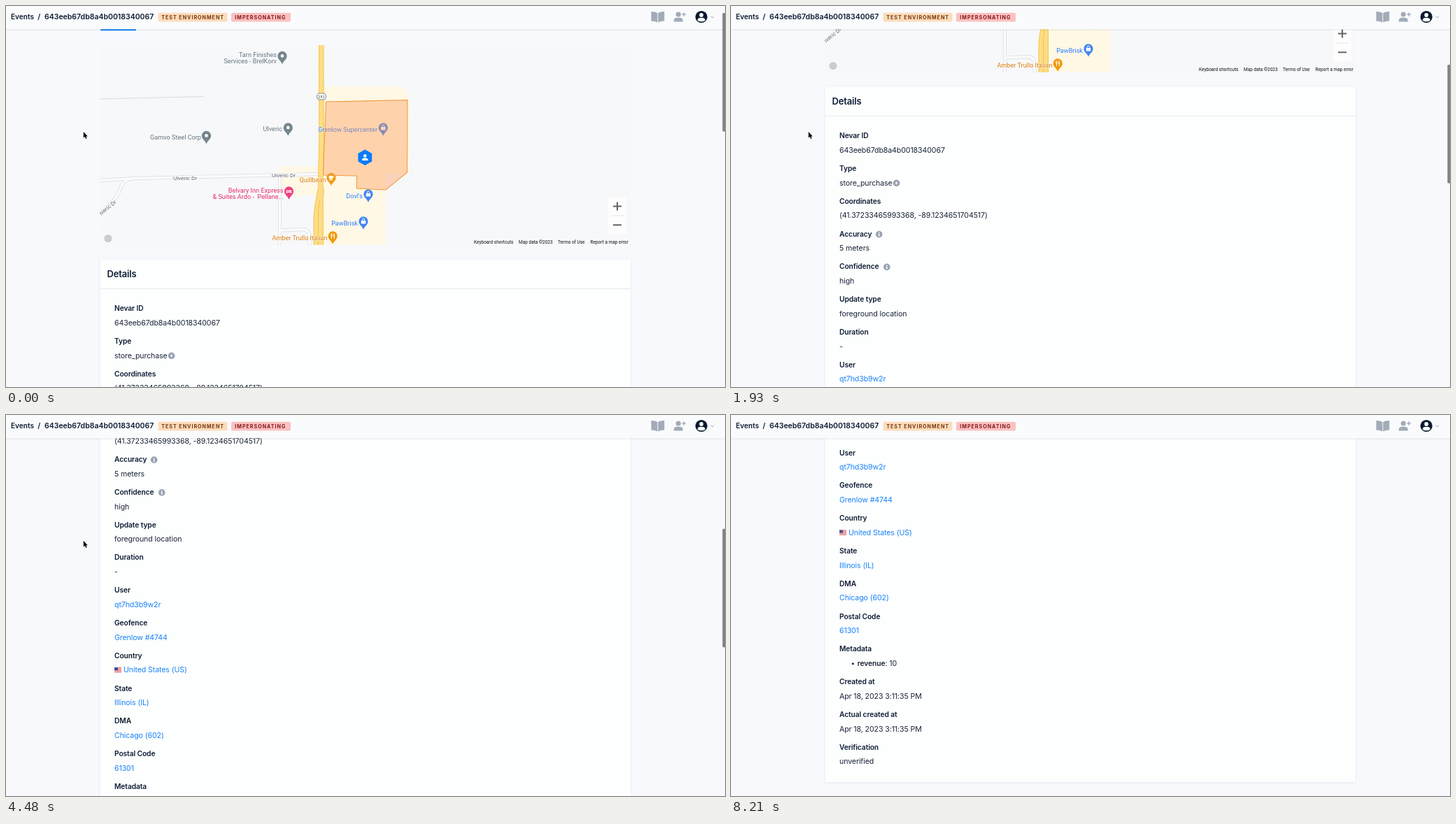
These frames come from a looping animation (1028 px wide and 545 px high, 9000 ms). An HTML page:

```html
<!DOCTYPE html>
<html lang="en">
<head>
<meta charset="utf-8">
<title>Event details</title>
<style>
  html, body { margin: 0; width: 100%; height: 100%; overflow: hidden; background: #f7f9fc; }
  svg { display: block; }
  text { font-family: Inter, "Open Sans", sans-serif; white-space: pre; }
  .label { font-size: 10.25px; font-weight: 600; letter-spacing: -.1px; fill: #0c1c33; }
  .value { font-size: 10.6px; letter-spacing: -.1px; fill: #182438; }
  .link { fill: #1782f8; }
  .crumb { font-weight: 600; fill: #0c1c33; }
  .badge { font-size: 7.2px; font-weight: 700; letter-spacing: .95px; }
  #map text { font-family: Roboto, Arial, sans-serif; }
  #places text { font-size: 9.15px; text-anchor: end; paint-order: stroke; stroke: #fff; stroke-opacity: .7; stroke-width: 1.2px; stroke-linejoin: round; }
  .street { font-size: 8px; fill: #5d6369; paint-order: stroke; stroke: #fff; stroke-width: 1.4px; }
  .credit { font-size: 6.5px; fill: #111; }
  .edge { fill: none; stroke: #d8dbdf; stroke-width: 5; }
  .lane { fill: none; stroke: #fafbfc; stroke-width: 3.6; }
</style>
</head>
<body>
<svg width="1028" height="545" viewBox="0 0 1028 545">
  <defs>
    <clipPath id="frame"><rect x="134" y="56" width="759.5" height="285.5"/></clipPath>
    <filter id="soft" x="-5%" y="-5%" width="110%" height="110%"><feGaussianBlur stdDeviation="1.3"/></filter>
    <path id="pin" d="M0 11.5C-1 6.5-6.6 5-6.6-.6A6.6 6.6 0 1 1 6.6-.6C6.6 5 1 6.5 0 11.5Z"/>
    <g id="dot"><circle cy="-.6" r="2.3"/></g>
    <g id="bag"><path d="M-3.2-1.6H3.2V3H-3.2Z"/><path d="M-1.6-1.4V-3A1.6 1.6 0 0 1 1.6-3V-1.4" fill="none" stroke="#fff"/></g>
    <g id="cup"><path d="M-3.2-3H2V0A2 2 0 0 1 0 2H-1.2A2 2 0 0 1-3.2 0ZM-3.2 2.6H2.4V3.4H-3.2Z"/><path d="M2-2.4H3.4V-.4H2" fill="none" stroke="#fff" stroke-width=".8"/></g>
    <g id="bed"><path d="M-3.8-2.8H-3V.4H3.8V2.8H3V1.5H-3V2.8H-3.8ZM-.3-2H2.6A1.2 1.2 0 0 1 3.8-.8V0H-.3Z"/><circle cx="-1.6" cy="-1" r="1"/></g>
    <path id="fork" d="M-3-4H-2.5V-1.6H-2V-4H-1.4V-1.6H-.9V-4H-.4V-1L-1.2 0V3.6H-2.2V0L-3-1ZM1-2.4Q1-4 2.6-4V3.6H1.7V.4H1Z"/>
  </defs>

  <g id="page">
    <rect x="135" y="31" width="51" height="4.2" fill="#0f80f5"/>

    <g id="map" clip-path="url(#frame)">
      <rect x="134" y="56" width="760" height="286" fill="#f7f8fa"/>
      <path d="M454 115H558Q572 116 574 126L577 133V240H543V342H454ZM392 229H450V271H410L392 258Z" fill="#fef8e5"/>
      <path d="M134 133L282 129.5" stroke="#d8dbdf" fill="none"/>
      <g id="roads"></g>
      <path d="M450.8 56L451 190L450 240L450 268" fill="none" stroke="#f1c35a" stroke-width="7.6"/>
      <path d="M446 262H454.5L453.2 276L453.5 290V342H440V300L442 284Z" fill="#fddd82" stroke="#f1c35a"/>
      <path d="M450.8 56L451 190L450 240L450 269" fill="none" stroke="#fddd82" stroke-width="5.8"/>
      <path d="M448.5 278L446.5 292V342" fill="none" stroke="#f1c35a"/>
      <rect x="444.5" y="125" width="13" height="9" rx="4" fill="#fff" stroke="#777d82" stroke-width=".9"/>
      <text x="451" y="131.8" font-size="6" text-anchor="middle" fill="#444">251</text>
      <text class="street" x="239" y="248.6">Ulveric Dr</text>
      <text class="street" x="380" y="245">Ulveric Dr</text>
      <text class="street" transform="translate(136 299.5) rotate(-39)">lveric Dr</text>
      <g id="places"></g>
      <path d="M457.5 137L574 134.5L573.5 238L543 263L501.5 261V243L453.5 242Z" fill="rgb(253,150,80)" fill-opacity=".38" stroke="#f4993f" stroke-width="1.1"/>
      <path d="M513.3 206.2L522.5 211.3V222L513.3 227.2L504.1 222V211.3Z" fill="#0a7bfa" stroke="#0a7bfa" stroke-width="1.4" stroke-linejoin="round"/>
      <circle cx="513.3" cy="214.2" r="2.2" fill="#fff"/>
      <path d="M509 221V219.6Q509.4 217.5 513.3 217.3Q517.2 217.5 517.6 219.6V221Z" fill="#fff"/>
      <circle cx="146" cy="332.5" r="5.5" fill="#c9ccd0"/>
      <rect x="861" y="273.5" width="26" height="53" rx="1.5" fill="#fdfdfe"/>
      <path d="M865 300H883" stroke="#e4e6e8"/>
      <path d="M868 286.5H880M874 280.5V292.5M868 313.2H880" stroke="#666" stroke-width="2.1"/>
      <text class="credit" x="669" y="339.8">Keyboard shortcuts</text>
      <text class="credit" x="733" y="339.8">Map data ©2023</text>
      <text class="credit" x="789" y="339.8">Terms of Use</text>
      <text class="credit" x="835.5" y="339.8">Report a map error</text>
    </g>

    <rect x="134" y="363" width="759.5" height="869" rx="2" fill="#dfe4ea" filter="url(#soft)"/>
    <rect x="134.3" y="362.5" width="759" height="868.7" rx="2" fill="#fdfefe"/>
    <path d="M134.3 404.5H893.3" stroke="#e5e9ee"/>
    <text x="144.5" y="387.6" class="label" style="font-size:12.9px">Details</text>
    <g id="rows"></g>
  </g>

  <rect y="33.2" width="1028" height="1.6" fill="#0c1c33" fill-opacity=".07"/>
  <rect width="1028" height="33.2" fill="#fafbfc"/>
  <text class="crumb" x="7" y="18.8" font-size="10.1">Events</text>
  <text class="crumb" x="45.3" y="18.8" font-size="10.5">/</text>
  <text class="crumb" x="55" y="18.8" font-size="10.5">643eeb67db8a4b0018340067</text>
  <rect x="217.5" y="9.8" width="99" height="12.6" rx="2" fill="#fddcbb"/>
  <text class="badge" x="222.3" y="18.6" fill="#77380f">TEST ENVIRONMENT</text>
  <rect x="322" y="9.8" width="85" height="12.6" rx="2" fill="#fbc1c1"/>
  <text class="badge" x="327.3" y="18.6" fill="#851818">IMPERSONATING</text>
  <g fill="#a2abb8">
    <path d="M922.5 8Q928 7.8 931.4 10V23.6Q928 21.6 922.5 21.6ZM941.3 8Q935.8 7.8 932.4 10V23.6Q935.8 21.6 941.3 21.6Z"/>
    <circle cx="961.3" cy="12" r="3.6"/>
    <path d="M954.8 22.5V20.5Q955.4 16.8 959 16.8H963.5Q967.2 16.8 967.8 20.5V22.5Z"/>
    <path d="M966.5 12H972M969.25 9.2V14.8" stroke="#a2abb8" stroke-width="1.4"/>
  </g>
  <circle cx="994.2" cy="15.5" r="8.6" fill="#0a1a2f"/>
  <circle cx="994.2" cy="13" r="2.9" fill="#fff"/>
  <path d="M988.6 20.4Q989.4 17 992 17H996.4Q999 17 999.8 20.4Q997.6 22.3 994.2 22.3Q990.8 22.3 988.6 20.4Z" fill="#fff"/>
  <path d="M1007.6 14.6L1010 17L1012.4 14.6" fill="none" stroke="#a2abb8" stroke-width="1"/>

  <rect id="thumb" x="1024.4" y="10" width="5" height="169.5" rx="1.5" fill="#808184"/>
  <path id="cursor" d="M110.8 180V188.6L112.8 186.9L114.2 190L115.6 189.4L114.2 186.4H116.8Z" fill="#000" stroke="#fff" stroke-width=".8" paint-order="stroke"/>
</svg>

<script>
  const $ = id => document.getElementById(id);

  // Streets: pale casing below, lane on top
  const streets = [
    'M134 249.5Q160 248 184 246.5L446 240.5',
    'M180 247Q168 248 163 262Q158 278 134 298',
    'M391.5 243V342',
    'M392 321L424 319.5Q434 320 434 330V342'
  ];
  $('roads').innerHTML = ['edge', 'lane']
    .map(c => streets.map(d => `<path class="${c}" d="${d}"/>`).join('')).join('');

  // Places: icon, pin x, pin y, colour, text right edge, lines with baselines
  const slate = '#74858e', blue = '#4285f4', amber = '#f09a0c', pink = '#ee3f80';
  const places = [
    ['dot', 395, 72, slate, 387, ['Tarn Finishes', 72.5], ['Services - BrelKorv', 81.5]],
    ['dot', 403.3, 174.5, slate, 395, ['Ulveric', 179]],
    ['dot', 286.5, 186, slate, 279, ['Gamvo Steel Corp', 190.5]],
    ['bag', 539.3, 174.5, blue, 531, ['Grenlow Supercenter', 179.5]],
    ['cup', 465, 246, amber, 457.5, ['Quillbean', 251.5]],
    ['bed', 404.5, 265.5, pink, 396.5, ['Belvary Inn Express', 266.5], ['& Suites Ardo -  Pellane...', 275.5]],
    ['bag', 518, 269.5, blue, 510, ["Dovl's", 274.5]],
    ['bag', 511, 308.5, blue, 503, ['PawBrisk', 313.5]],
    ['fork', 467.2, 329.5, amber, 459.5, ['Amber Trullo Italian', 335]]
  ];
  const ink = { [slate]: '#5f707a', [blue]: '#2f78ec', [amber]: '#d97a08', [pink]: '#e0286c' };
  $('places').innerHTML = places.map(([icon, x, y, color, right, ...lines]) =>
    lines.map(([s, base]) => `<text x="${right}" y="${base}" fill="${ink[color]}">${s.replace('&', '&amp;')}</text>`).join('') +
    `<g transform="translate(${x} ${y})"><use href="#pin" fill="${color}"/><use href="#${icon}" fill="#fff"/></g>`
  ).join('');

  const date = 'Apr 18, 2023 3:11:35 PM';
  const rows = [
    ['Nevar ID', '643eeb67db8a4b0018340067'],
    ['Type', 'store_purchase'],
    ['Coordinates', '(41.37233465993368, -89.1234651704517)'],
    ['Accuracy', '5 meters'],
    ['Confidence', 'high'],
    ['Update type', 'foreground location'],
    ['Duration', '-'],
    ['User', 'qt7hd3b9w2r', 1],
    ['Geofence', 'Grenlow #4744', 1],
    ['Country', 'United States (US)', 1],
    ['State', 'Illinois (IL)', 1],
    ['DMA', 'Chicago (602)', 1],
    ['Postal Code', '61301', 1],
    ['Metadata', '<tspan font-weight="600" font-size="10.3">revenue</tspan>: 10'],
    ['Created at', date],
    ['Actual created at', date],
    ['Verification', 'unverified']
  ];
  const indent = { Country: 168, Metadata: 180.7 };
  const rowY = i => 436.2 + i * 46.78;

  const disc = (x, y, glyph) =>
    `<g transform="translate(${x} ${y})"><circle r="4.8" fill="#98a2b2"/><path d="${glyph}" fill="#fff"/></g>`;
  const info = 'M-.7-2.8H.7V-1.5H-.7ZM-1.2-.8H.7V1.8H1.3V2.7H-1.3V1.8H-.6V.1H-1.2Z';
  const bolt = 'M.6-3.2L-2 .6H-.3L-.7 3.2L2-.7H.2Z';

  function flag(x, y) {
    let s = `<rect x="${x}" y="${y}" width="10" height="7" fill="#fff"/>`;
    for (let i = 0; i < 4; i++) s += `<rect x="${x}" y="${y + i * 2}" width="10" height="1" fill="#e0424c"/>`;
    return s + `<rect x="${x}" y="${y}" width="5" height="4" fill="#3b5296"/>`;
  }

  $('rows').innerHTML = rows.map(([label, value, link], i) =>
    `<text class="label" x="155" y="${rowY(i)}">${label}</text>` +
    `<text class="value${link ? ' link' : ''}" x="${indent[label] || 155}" y="${rowY(i) + 20.7}">${value}</text>`
  ).join('') +
    disc(236.6, rowY(1) + 17.3, bolt) +
    disc(211.7, rowY(3) - 2.9, info) +
    disc(222.8, rowY(4) - 2.9, info) +
    flag(155, rowY(9) + 13.4) +
    `<circle cx="174.3" cy="${rowY(13) + 17.3}" r="1.5" fill="#182438"/>`;

  // Scroll positions by tick, joined by a monotone cubic
  const LOOP = 9000, TICK = 149.25, LEAD = 14;
  const keys = [[0, 0], [5, 116], [13, 247], [17, 307], [19, 307], [22, 365],
                [30, 509.5], [38, 580.5], [48, 704], [49, 705.5], [50, 706], [61, 706]];
  const slope = i => (keys[i + 1][1] - keys[i][1]) / (keys[i + 1][0] - keys[i][0]);

  function tangent(i) {
    if (i === 0) return slope(0);
    if (i === keys.length - 1) return 0;
    const a = slope(i - 1), b = slope(i);
    return a * b > 0 ? 2 * a * b / (a + b) : 0;
  }

  function scrollAt(n) {
    let i = 0;
    while (i < keys.length - 2 && n >= keys[i + 1][0]) i++;
    const [x0, y0] = keys[i], [x1, y1] = keys[i + 1];
    const w = x1 - x0, u = (n - x0) / w, v = 1 - u;
    return y0 * (1 + 2 * u) * v * v + tangent(i) * w * u * v * v +
           y1 * u * u * (3 - 2 * u) - tangent(i + 1) * w * u * u * v;
  }

  function draw(now) {
    const n = Math.floor((now % LOOP + LEAD) / TICK);
    const y = Math.round(scrollAt(n) * 2) / 2;
    $('page').setAttribute('transform', `translate(0 ${-y})`);
    $('thumb').setAttribute('y', 10 + y * .3);
    $('thumb').setAttribute('opacity', Math.min(1, Math.max(0, (55 - n) / 4)));
    $('cursor').setAttribute('opacity', n < 55 ? 1 : 0);
  }

  const start = performance.now();
  function loop() {
    draw(performance.now() - start);
    requestAnimationFrame(loop);
  }
  loop();
</script>
</body>
</html>
```
